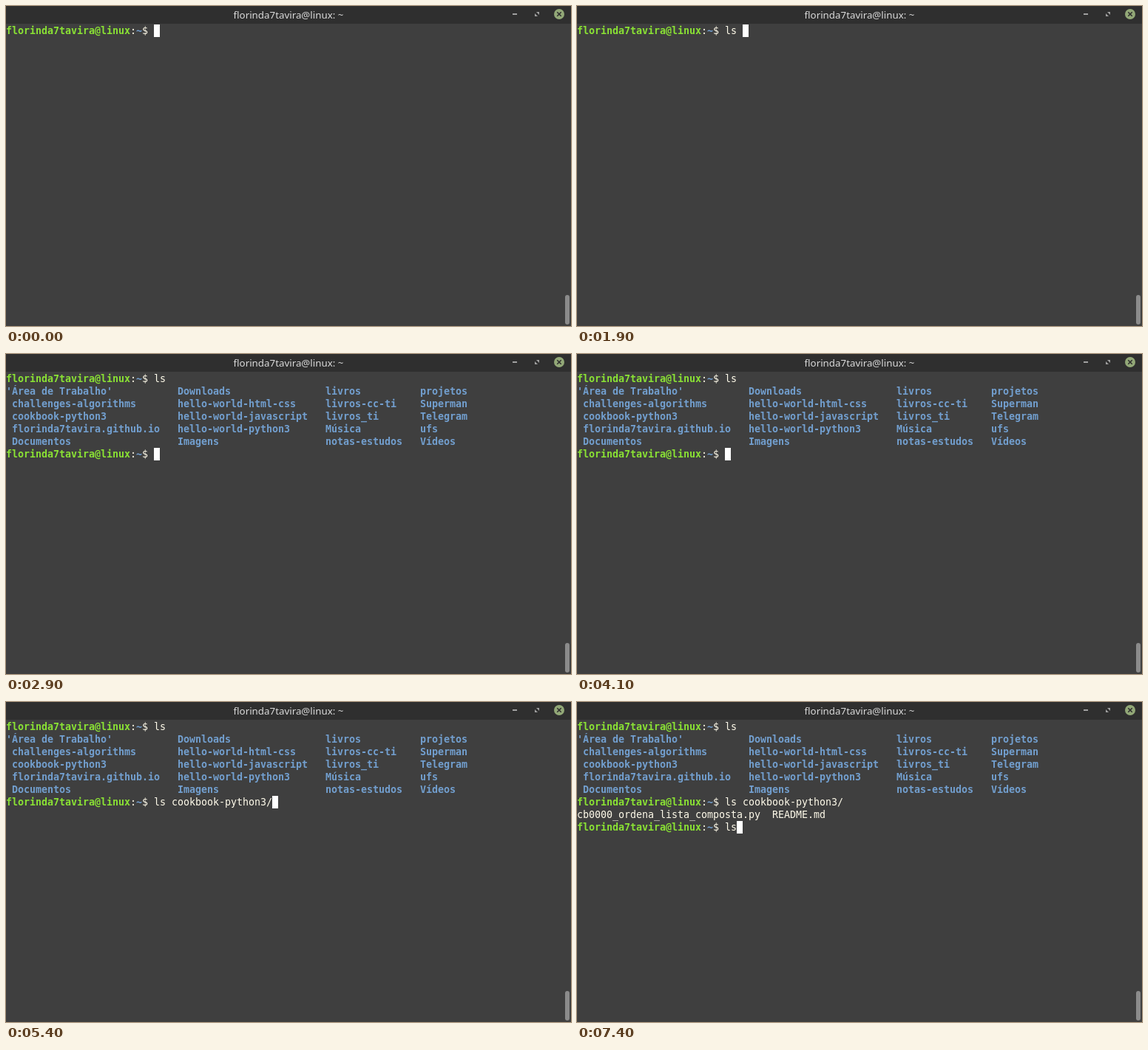
These frames come from a looping animation (764 px wide and 433 px high, 8000 ms). An HTML page with a canvas:

```html
<!DOCTYPE html>
<html lang="pt">
<head>
<meta charset="utf-8">
<title>Terminal</title>
<style>
  html, body { margin: 0; width: 100%; height: 100%; overflow: hidden; background: #3f3f3f; }
  canvas { display: block; }
</style>
</head>
<body>
<canvas id="stage" width="764" height="433"></canvas>
<script>
const ctx = document.getElementById('stage').getContext('2d');
const LOOP = 8000, CELL = 8, LINE = 17, TOP = 25, BASE = 13;
const GREEN = '#8ae234', BLUE = '#729fcf', TEXT = '#fffbea';
const MONO = '13.333px "DejaVu Sans Mono", monospace';
const USER = 'florinda7tavira', HOST = USER + '@linux';
const PROMPT_COLS = HOST.length + 4;

const COLUMNS = [
  [0, ["'Área de Trabalho'", ' challenges-algorithms', ' cookbook-python3', ` ${USER}.github.io`, ' Documentos']],
  [29, ['Downloads', 'hello-world-html-css', 'hello-world-javascript', 'hello-world-python3', 'Imagens']],
  [54, ['livros', 'livros-cc-ti', 'livros_ti', 'Música', 'notas-estudos']],
  [70, ['projetos', 'Superman', 'Telegram', 'ufs', 'Vídeos']]
];
const FULL = 'ls cookbook-python3/';
const PROMPT_ROWS = [0, 6, 8];

// [time, prompt index, typed text, cursor visible]
const STEPS = [
  [0, 0, '', true], [500, 0, '', false], [1100, 0, '', true],
  [1600, 0, 'l', true], [1700, 0, 'ls', true], [1900, 0, 'ls ', true],
  [2500, 0, 'ls ', false], [2600, 0, 'ls ', true], [2700, 0, 'ls', true],
  [2900, 1, '', true], [3500, 1, '', false], [4100, 1, '', true],
  [4500, 1, 'l', true], [4600, 1, 'ls', true], [4700, 1, 'ls ', true],
  [4900, 1, 'ls c', true], [5000, 1, 'ls co', true], [5200, 1, 'ls coo', true],
  [5400, 1, FULL, true], [6000, 1, FULL, false],
  [6200, 2, '', true], [6800, 2, '', false],
  [7300, 2, 'l', true], [7400, 2, 'ls', true]
];

function print(text, col, row, color = TEXT, bold = false) {
  ctx.font = (bold ? 'bold ' : '') + MONO;
  ctx.fillStyle = color;
  [...text].forEach((ch, i) => ctx.fillText(ch, (col + i) * CELL, TOP + row * LINE + BASE));
}

function prompt(row, command) {
  const n = HOST.length;
  print(HOST, 0, row, GREEN, true);
  print(':', n, row);
  print('~', n + 1, row, BLUE, true);
  print('$', n + 2, row);
  print(command, PROMPT_COLS, row);
}

function line(color, width, ...points) {
  ctx.strokeStyle = color;
  ctx.lineWidth = width;
  ctx.beginPath();
  points.forEach(([x, y]) => ctx.lineTo(x, y));
  ctx.stroke();
}

function triangle(...points) {
  ctx.beginPath();
  points.forEach(([x, y]) => ctx.lineTo(x, y));
  ctx.fill();
}

function drawWindow() {
  ctx.fillStyle = '#3f3f3f';
  ctx.fillRect(0, 0, 764, 433);
  ctx.fillStyle = '#2f2f2f';
  ctx.fillRect(0, 0, 764, 24);

  ctx.font = '500 13.333px "Noto Sans", sans-serif';
  ctx.fillStyle = '#dadada';
  ctx.textAlign = 'center';
  ctx.fillText(HOST + ': ~', 382, 17);
  ctx.textAlign = 'left';

  ctx.fillStyle = '#a0a0a0';
  ctx.fillRect(685, 10, 6, 2);
  triangle([717, 8], [721, 8], [721, 12]);
  triangle([715, 10], [715, 14], [719, 14]);

  ctx.fillStyle = '#92a877';
  ctx.beginPath();
  ctx.arc(748, 11, 7, 0, Math.PI * 2);
  ctx.fill();
  line('#2f2f2f', 1.6, [745.3, 8.3], [750.7, 13.7]);
  line('#2f2f2f', 1.6, [750.7, 8.3], [745.3, 13.7]);

  ctx.fillStyle = '#8b8b8b';
  ctx.beginPath();
  ctx.roundRect(756, 391, 6, 40, 3);
  ctx.fill();
}

function draw(time) {
  const [, index, typed, cursor] = STEPS.findLast(step => step[0] <= time);
  drawWindow();
  if (index > 0) {
    prompt(0, 'ls');
    for (const [col, names] of COLUMNS) {
      names.forEach((name, i) => print(name, col, i + 1, BLUE, true));
    }
  }
  if (index > 1) {
    prompt(6, FULL);
    print('cb0000_ordena_lista_composta.py  README.md', 0, 7);
  }
  const row = PROMPT_ROWS[index];
  prompt(row, typed);
  if (cursor) {
    ctx.fillStyle = '#fff';
    ctx.fillRect((PROMPT_COLS + typed.length) * CELL, TOP + row * LINE, CELL, LINE);
  }
}

const start = performance.now();
function tick() {
  draw((performance.now() - start) % LOOP);
  requestAnimationFrame(tick);
}
tick();
</script>
</body>
</html>
```
